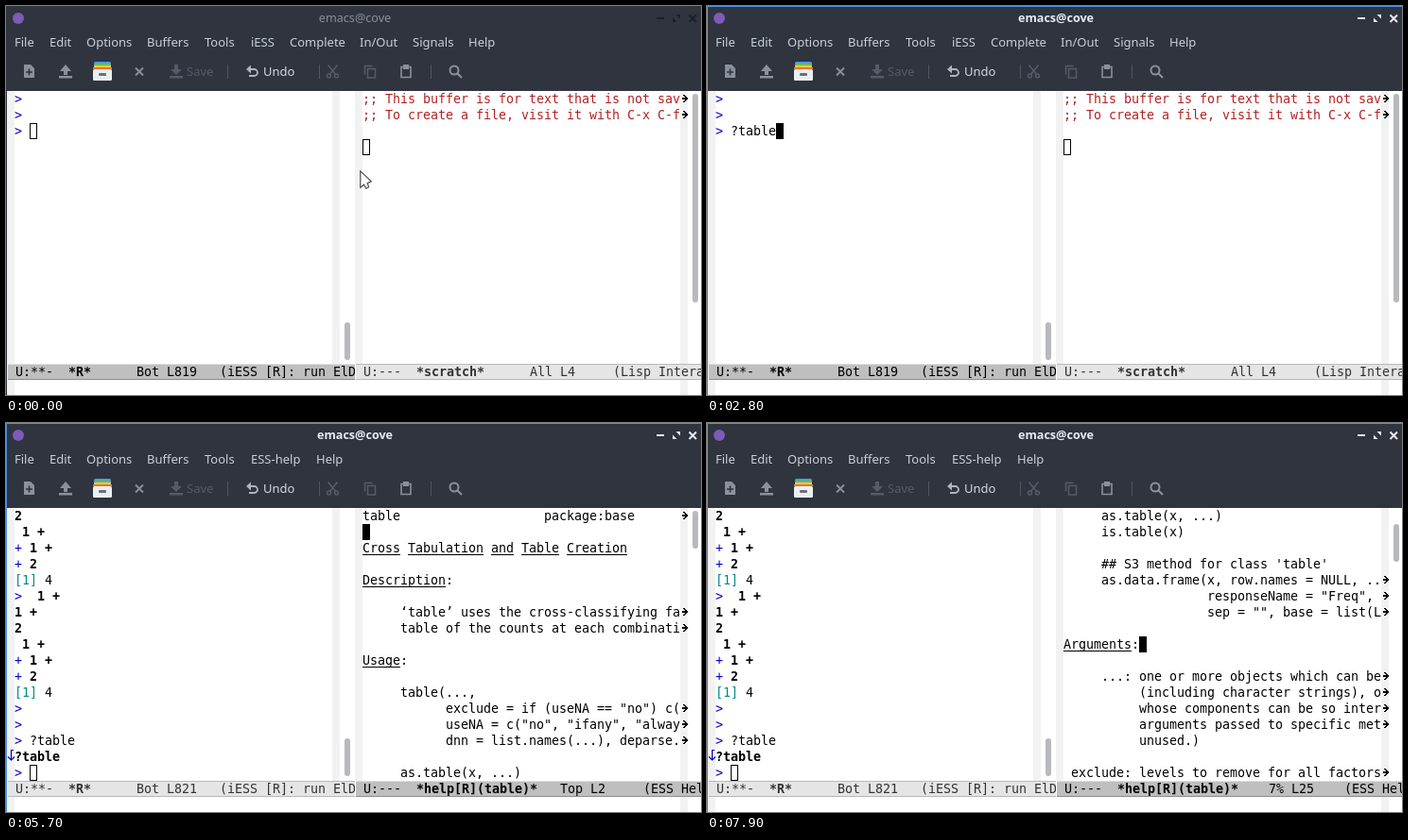
Write an HTML page with a canvas that moves like this. It is 735x412 px and loops after 8 s.

```html
<!DOCTYPE html>
<html lang="en">
<head>
<meta charset="utf-8">
<title>Editor session</title>
<style>
html, body { margin: 0; width: 100%; height: 100%; overflow: hidden; background: #fff; }
canvas { display: block; width: 735px; height: 412px; }
</style>
</head>
<body>
<canvas id="stage" width="735" height="412"></canvas>
<script>
const ctx = document.getElementById('stage').getContext('2d');
const LOOP = 8000, CW = 8, RH = 17, TOP = 90, LEFT = 9, RIGHT = 377;
const MONO = '13.33px "DejaVu Sans Mono", monospace';
const SANS = '"Noto Sans", "Open Sans", sans-serif';
const BAR = '#2f343f', BLUE = '#0000cd', FRINGE = '#f2f2f2';

// In buffer text, ~ toggles bold and _ toggles underline.
const SCRATCH = [
  ';; This buffer is for text that is not saved',
  ';; To create a file, visit it with C-x C-f and'
];
const HELP = [
  'table                   package:base                   R Doc', '',
  '_Cross_ _Tabulation_ _and_ _Table_ _Creation_', '',
  '_Description_:', '',
  '     ‘table’ uses the cross-classifying factors',
  '     table of the counts at each combination', '',
  '_Usage_:', '',
  '     table(...,',
  '           exclude = if (useNA == "no") c(NA, NaN),',
  '           useNA = c("no", "ifany", "always"),',
  '           dnn = list.names(...), deparse.level', '',
  '     as.table(x, ...)'
];
const ARGS = [
  '     as.table(x, ...)',
  '     is.table(x)', '',
  "     ## S3 method for class 'table'",
  '     as.data.frame(x, row.names = NULL, ...,',
  '                   responseName = "Freq", string',
  '                   sep = "", base = list(LETTERS))', '',
  '_Arguments_:', '',
  '     ...: one or more objects which can be inter',
  '          (including character strings), or a',
  '          whose components can be so interpreted',
  '          arguments passed to specific methods',
  '          unused.)', '',
  ' exclude: levels to remove for all factors in'
];
const SUM = ['~2~', ' ~1 +~', '+ ~1 +~', '+ ~2~', '[1] 4'];
const SESSION = [...SUM, '>  ~1 +~', '~1 +~', ...SUM, '>', '>', '> ?table', '~?table~', '>'];

const MENU = [['File', 9], ['Edit', 46], ['Options', 85], ['Buffers', 149], ['Tools', 210]];
const R_MENU = [['iESS', 259], ['Complete', 300], ['In/Out', 374], ['Signals', 430], ['Help', 489]];
const HELP_MENU = [['ESS-help', 259], ['Help', 328]];

const FOCUS = 300, HELP_AT = 3200;
const KEYS = [FOCUS, 800, 1100, 1900, 2200, 2300, 2400, 2600, 2800,
  HELP_AT, 5700, 6200, 6400, 7200, 7600, 7900];
const TYPED = [1900, 2200, 2300, 2400, 2600, 2800];
const POINTER = [[0, 374, 174], [100, 350, 169], [200, 318, 163], [300, 288, 158],
  [400, 265, 153], [800, 247, 143], [900, 239, 137], [1000, 234, 134], [1900]];
// time, row, column, line label
const MOVES = [[HELP_AT, 0, 0, 'Top L1'], [5700, 1, 0, 'Top L2'], [6200, 2, 0, 'Top L3'],
  [6400, 3, 0, 'Top L4'], [7200, 4, 12, 'Top L5'], [7600, 9, 6, 'Top L10'], [7900, 8, 10, ' 7% L25']];

const latest = (list, t) => list.filter(e => e[0] <= t).pop();

function rect(x, y, w, h, color) {
  ctx.fillStyle = color;
  ctx.fillRect(x, y, w, h);
}

function pill(x, y, w, h, r, color) {
  ctx.fillStyle = color;
  ctx.beginPath();
  ctx.roundRect(x, y, w, h, r);
  ctx.fill();
}

function label(s, x, y, color, size = 13, weight = '', align = 'left') {
  ctx.font = `${weight} ${size}px ${SANS}`;
  ctx.textAlign = align;
  ctx.fillStyle = color;
  ctx.fillText(s, x, y);
  ctx.textAlign = 'left';
}

function stroke(d, color, width = 1) {
  ctx.strokeStyle = color;
  ctx.lineWidth = width;
  ctx.stroke(new Path2D(d));
}

function fill(d, color) {
  ctx.fillStyle = color;
  ctx.fill(new Path2D(d));
}

function clipped(x, y, w, h, draw) {
  ctx.save();
  ctx.beginPath();
  ctx.rect(x, y, w, h);
  ctx.clip();
  draw();
  ctx.restore();
}

// Fixed-grid text; colorAt may override the colour of a column.
function mono(s, x, y, color, colorAt) {
  let bold = false, line = false, col = 0;
  for (const ch of s) {
    if (ch === '~') { bold = !bold; continue; }
    if (ch === '_') { line = !line; continue; }
    const px = x + col * CW;
    ctx.font = (bold ? 'bold ' : '') + MONO;
    ctx.fillStyle = (colorAt && colorAt(col)) || color;
    ctx.fillText(ch, px, y + 13);
    if (line) ctx.fillRect(px, y + 15, CW, 1);
    col++;
  }
}

function truncArrow(y) {
  [[3, 2], [4, 2], [5, 2], [2, 6], [2, 6], [5, 2], [4, 2], [3, 2]]
    .forEach(([x, w], i) => rect(713 + x, y + 4 + i, w, 1, '#000'));
}

function cursor(x, row, col, solid) {
  const px = x + col * CW, y = TOP + row * RH;
  if (solid) return rect(px, y, CW, RH, '#000');
  ctx.strokeStyle = '#000';
  ctx.lineWidth = 1;
  ctx.strokeRect(px + .5, y + .5, CW - 1, RH - 1);
}

function modeLine(x, w, active, s) {
  rect(x, 379, w, 17, active ? '#bfbfbf' : '#e5e5e5');
  rect(x, 379, w, 1, active ? '#dcdcdc' : '#b8b8b8');
  rect(x, 395, w, 1, active ? '#8c8c8c' : '#b8b8b8');
  clipped(x, 379, w, 17, () => mono(s, x + 8, 379, active ? '#000' : '#333'));
}

function titleBar(focused) {
  const c = focused ? '#e8ebf0' : '#89909c', dim = focused ? '#e8ebf0' : '#1c1f26';
  rect(0, 0, 735, 90, BAR);
  label('emacs@cove', 369, 17, c, 12.6, focused ? 'bold' : '', 'center');
  ctx.fillStyle = '#7f5ab6';
  ctx.beginPath();
  ctx.arc(13, 13, 6, 0, 7);
  ctx.fill();
  rect(688, 12, 8, 2, dim);
  fill('M708.5 9H713V13.5zM705 12.5V17H709.5z', dim);
  stroke('M722.5 9.5L730 17M730 9.5L722.5 17', dim, 2);
}

function toolBar() {
  const on = '#8b919c', off = '#555b67', lit = '#aeb5c0';
  fill('M19 62H26L30 66V76H19z', on);
  stroke('M24.5 66.5V73.5M21 70H28', BAR, 1.6);
  fill('M63 62L69 69H65V73H61V69H57zM56 74H70V76.5H56z', on);
  pill(93, 59, 18, 5, 1.5, '#4b9fe0');
  rect(94, 61, 16, 2, '#6cc04a');
  rect(93, 63, 18, 2, '#f2c53d');
  rect(92, 65, 20, 2, '#e8733c');
  pill(92, 67, 20, 12, 1.5, '#eceff1');
  pill(98, 71, 8, 3, 1, '#6b7078');
  stroke('M137 65.5L145 73.5M145 65.5L137 73.5', on, 1.8);
  fill('M178 62H182V67H186L180 73L174 67H178zM173 74H187V76.5H173z', off);
  label('Save', 191, 74, off);
  for (const x of [234, 331, 449]) rect(x, 62, 1, 15, '#505662');
  stroke('M256 67H262.5A3.5 3.5 0 0 1 262.5 74H257', lit, 1.8);
  fill('M254 67L259 62.5V71.5z', lit);
  label('Undo', 272, 74, '#d3dae3');
  stroke('M340.5 62.5L349 73M350.5 62.5L342 73', off, 1.6);
  stroke('M343.5 74A2 2 0 1 1 339.5 74A2 2 0 1 1 343.5 74M351.5 74A2 2 0 1 1 347.5 74A2 2 0 1 1 351.5 74', off, 1.5);
  stroke('M379.5 72.5V63.5H387.5M382.5 66.5H390.5V76H382.5z', off, 1.5);
  stroke('M418 64.5H428V75.5H418z', on, 1.6);
  rect(420, 62, 6, 5, on);
  stroke('M478.5 68A4.5 4.5 0 1 1 469.5 68A4.5 4.5 0 1 1 478.5 68M477.5 71.5L482 76', on, 2);
}

function windows() {
  rect(0, 90, 735, 322, '#fff');
  for (const x of [345, 369]) rect(x, 90, 8, 289, FRINGE);
  for (const x of [1, 713]) rect(x, 90, 8, 322, FRINGE);
}

function leftBuffer(help, t, on, focused) {
  const typed = TYPED.filter(k => k <= t).length;
  const fresh = t >= 800 && t < 900;
  const rows = help ? SESSION : ['>', '>', '> ' + '?table'.slice(0, typed)];
  rows.forEach((s, i) => {
    const lead = /^(\[1\]|[>+])/.exec(s);
    const c = s[0] === '[' ? '#008b8b' : BLUE;
    mono(s, LEFT, TOP + i * RH, '#000', col => lead && col < lead[0].length && c);
  });
  if (help) {
    stroke('M8 346.5H5.5V357M2 353.5L5.5 357L9 353.5', BLUE, 1.2);
    cursor(LEFT, 16, 2, false);
  } else if (on) {
    cursor(LEFT, fresh ? 3 : 2, fresh ? 0 : 2 + typed, focused);
  }
  pill(358, help ? 334 : 335, 6, 40, 3, '#b8b9bf');
  const n = help ? 821 : fresh ? 820 : 819;
  modeLine(2, 367, !help, `U:**-  ~*R*~      Bot L${n}   (iESS [R]: run ElDoc)`);
}

function rightBuffer(help, t, on) {
  const [, row, col, pos] = help ? latest(MOVES, t) : [0, 3, 0, ''];
  const rows = !help ? SCRATCH : t < 7900 ? HELP : ARGS;
  if (help && on) cursor(RIGHT, row, col, true);
  clipped(RIGHT, TOP, 336, 289, () => rows.forEach((s, i) =>
    mono(s, RIGHT, TOP + i * RH, help ? '#000' : '#b22222',
      c => help && on && i === row && c === col && '#fff')));
  rows.forEach((s, i) => {
    if (s.replace(/_/g, '').length > 42) truncArrow(TOP + i * RH);
  });
  if (!help) cursor(RIGHT, row, col, false);
  pill(726, t >= 7900 ? 107 : 93, 6, help ? 40 : 221, 3, '#b8b9bf');
  modeLine(370, 365, help, help
    ? `U:---  ~*help[R](table)*~   ${pos.padEnd(11)}(ESS Help)`
    : 'U:---  ~*scratch*~      All L4     (Lisp Interaction)');
}

function pointer(t) {
  const [, x, y] = latest(POINTER, t);
  if (x === undefined) return;
  ctx.save();
  ctx.translate(x, y);
  const d = 'M.8 .8V18.2L4.6 15.2L6.8 19.3L9.6 17.8L8.2 13.6L12.3 11.8z';
  fill(d, '#fff');
  stroke(d, '#4a4d55', 1.2);
  ctx.restore();
}

function draw(t) {
  const focused = t >= FOCUS, help = t >= HELP_AT;
  const last = KEYS.filter(k => k <= t).pop();
  const on = !focused || Math.floor((t - last) / 500) % 2 === 0;
  titleBar(focused);
  for (const [s, x] of [...MENU, ...(help ? HELP_MENU : R_MENU)]) label(s, x, 43, '#c9d0da');
  toolBar();
  windows();
  leftBuffer(help, t, on, focused);
  rightBuffer(help, t, on);
  const edge = focused ? '#4a90e2' : BAR;
  rect(0, 0, 735, 1, edge);
  rect(0, 0, 1, 412, edge);
  pointer(t);
}

const start = performance.now();
function tick() {
  draw((performance.now() - start) % LOOP);
  requestAnimationFrame(tick);
}
tick();
</script>
</body>
</html>
```
